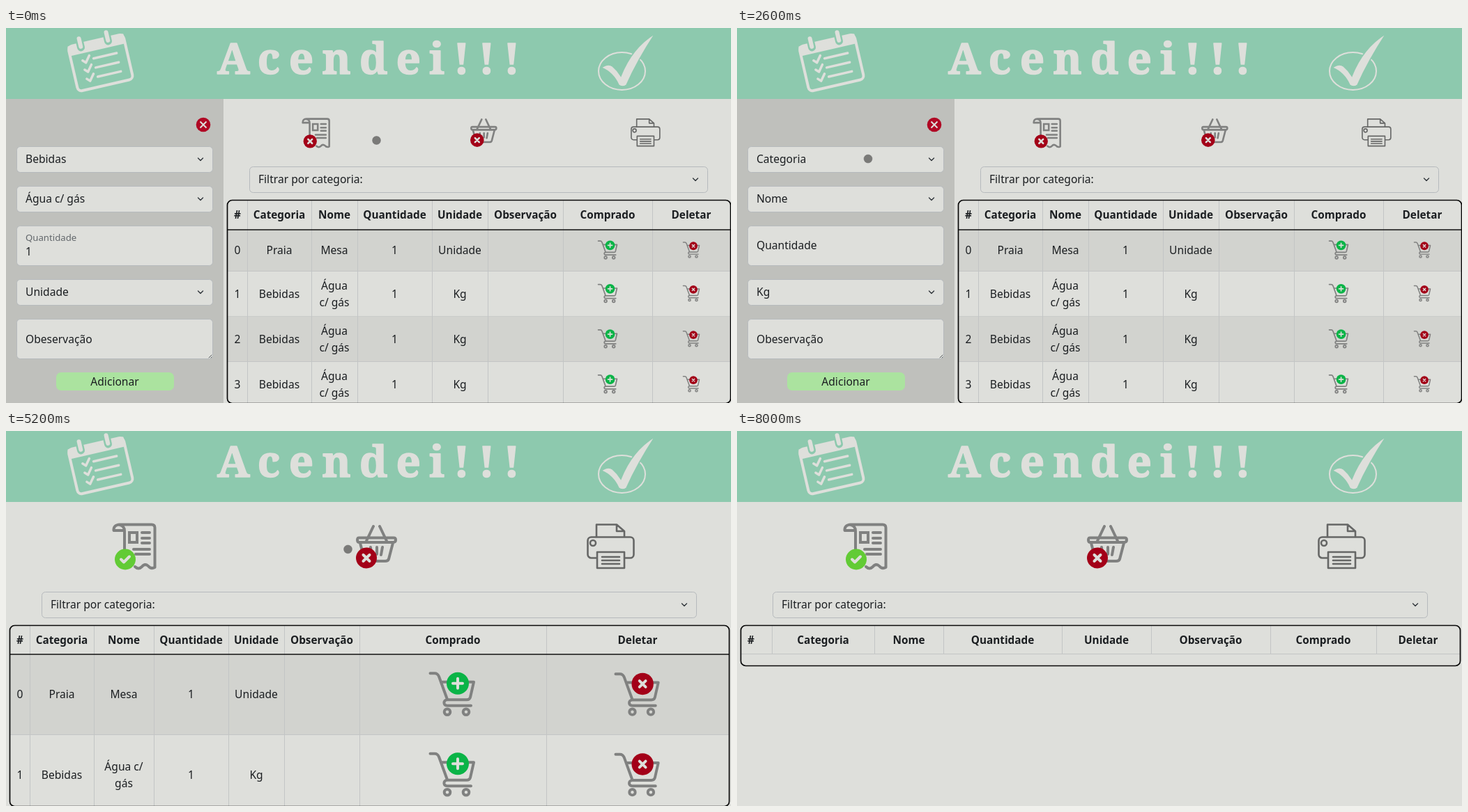
Animation of 1040x539 px, one loop 8700 ms. Source, as an HTML page:

```html
<!DOCTYPE html>
<html lang="pt">
<head>
<meta charset="utf-8">
<style>
html, body { margin: 0; width: 100%; height: 100%; overflow: hidden; background: #dedfdb; }
svg { display: block; width: 100%; height: 100%; }
text { font: 15.6px "Noto Sans", "Open Sans", sans-serif; fill: #1b1e21; }
.mid { text-anchor: middle; }
.head { font-size: 15.3px; font-weight: 700; }
.small { font-size: 13.2px; fill: #62676b; }
.title { font: 900 62px "Noto Serif", serif; letter-spacing: 12.3px; fill: #dedfdb; stroke: #dedfdb; stroke-width: 1.5; stroke-linejoin: round; }
.icon { fill: none; stroke: #808180; stroke-width: 4; stroke-linecap: round; stroke-linejoin: round; }
.mark { fill: none; stroke: #dedfdb; stroke-width: 4; }
.box { fill: #dedfdb; stroke: #b6babd; }
.rule { stroke: #c3c5c5; fill: none; }
.arrow { fill: none; stroke: #30363b; stroke-width: 1.4; stroke-linecap: round; stroke-linejoin: round; }
</style>
</head>
<body>
<svg viewBox="0 0 1040 539" preserveAspectRatio="none">
  <rect width="1040" height="539" fill="#dedfdb"/>
  <rect width="1040" height="102" fill="#8dc9ae"/>
  <g transform="translate(136 49) rotate(-13)" fill="none" stroke="#dedfdb" stroke-width="3.5" stroke-linecap="round" stroke-linejoin="round">
    <rect x="-41" y="-32" width="81" height="66" rx="6" stroke-width="4"/>
    <path d="M-40-31H39V-20H-40Z" fill="#dedfdb"/>
    <path d="M-23-39V-27M17-39V-27" stroke="#8dc9ae" stroke-width="11"/>
    <path d="M-23-40V-28M17-40V-28" stroke-width="6"/>
    <path d="M-9-7.5H25M-9 6H25M-9 19.5H25M-25-8l4 4 7-9M-25 5.5l4 4 7-9M-25 19l4 4 7-9"/>
  </g>
  <text class="title" x="303" y="66">Acendei!!!</text>
  <ellipse cx="883.5" cy="62" rx="33.5" ry="27" fill="none" stroke="#dedfdb" stroke-width="2"/>
  <path d="M854 57Q864 50 870 55Q877 61 882 69Q898 28 931 8Q905 48 890 82Q884 86 879 82Q871 64 854 57Z" fill="#dedfdb" stroke="#8dc9ae" stroke-width="1.5"/>
  <g id="page"></g>
  <circle id="dot" r="6.5" fill="#000" fill-opacity=".45" stroke="#fff" stroke-opacity=".3"/>
</svg>
<script>
const page = document.getElementById('page'), dot = document.getElementById('dot');
const RED = '#a30018', GREEN = '#0ab447', LIME = '#62cb35';
const heads = ['#', 'Categoria', 'Nome', 'Quantidade', 'Unidade', 'Observação', 'Comprado', 'Deletar'];

const text = (x, y, s, cls = '') => `<text x="${x}" y="${y + 5.5}" class="${cls}">${s}</text>`;
const box = (x, y, w, h, cls = 'box', r = 5) =>
  `<rect x="${x + .5}" y="${y + .5}" width="${w}" height="${h}" rx="${r}" class="${cls}"/>`;
const arrow = (x, y) => `<path class="arrow" d="M${x - 3.5} ${y - 1.5}l3.5 3.5 3.5-3.5"/>`;
const select = (x, y, w, label) =>
  box(x, y, w, 37) + text(x + 13, y + 18.5, label) + arrow(x + w - 17, y + 18.5);
const place = (x, y, k, body) => `<g transform="translate(${x} ${y}) scale(${k})" class="icon">${body}</g>`;

const signs = { x: 'M-4.5-4.5L4.5 4.5M4.5-4.5L-4.5 4.5', plus: 'M-7 0H7M0-7V7', ok: 'M-6 0l4 4 8-8' };
const badge = (x, y, color, sign, r = 15) =>
  `<g transform="translate(${x} ${y})"><circle r="${r}" fill="${color}" stroke="none"/><path class="mark" d="${signs[sign]}"/></g>`;

const list = ok =>
  `<path d="M18 11H2.5Q2 3 11 2.5H57Q61.500 2.500 61.500 7V64Q56 67 52 62Q47 58 43 63Q38 68 33 63M11 3Q18 4 18 12V40"/>
   <path d="M25 14H36V28H25ZM43 14H54M43 22H54M43 29H54M31 38H54M34 45H54" stroke-linejoin="miter"/>` +
  badge(19, 52.5, ok ? LIME : RED, ok ? 'ok' : 'x');
const basket =
  `<path d="M15 23L25 2M44 23L34 2M5 18.500H54Q57 18.500 57 21.500T54 25H5Q2 25 2 21.500T5 18.500M6 26L12 49Q13 52 17 52H42Q46 52 47 49L53 26M21 32L22 41M30 32V42M38 32L36 43"/>` +
  badge(15, 47.5, RED, 'x');
const printer =
  `<g stroke="#666766" stroke-width="2.6"><path d="M14 19V1.500H43L54 11V19M43 2V11H53"/>
   <rect x="1.500" y="19.500" width="66" height="30" rx="5"/><circle cx="9" cy="28" r="4"/>
   <path d="M15 41H54V64H15Z" fill="#dedfdb"/><path d="M22 48H47M22 53H47M22 58H47"/></g>`;
const cart = (color, sign) =>
  `<path d="M2.500 2.500H9Q13 2.500 15 7L27 40M20 15H65L60 37Q59 40.500 55 40.500H27Q22 41 22.500 45.500Q23 49 28 49H61"/>
   <circle cx="27" cy="58" r="4.300"/><circle cx="54" cy="58" r="4.300"/>` + badge(42, 17, color, sign, 16);

const wide = {
  x: 5, y: 279, w: 1032, h: 261, line: 321, cols: [34, 126, 212, 319, 399, 507, 775], rows: [321, 436, 552],
  name: ['Água c/', 'gás'], icons: [[152, 132, 1], [502, 135, 1], [833, 133, 1]],
  carts: [[606, 33, 1], [872, 32, .98]], filter: [51, 231, 939]
};
const narrow = {
  x: 317, y: 247, w: 722, h: 293, line: 290, cols: [346, 438, 504, 611, 691, 799, 927], rows: [290, 349, 414.5, 479.5, 544.5],
  name: ['Água', 'c/ gás'], icons: [[424, 129, .645], [666, 130, .655], [896, 130, .62]],
  carts: [[848.5, 14.5, .43], [970.5, 12.5, .37]], filter: [349, 199, 657]
};
const empty = { ...wide, h: 59, cols: [50, 197, 296, 466, 594, 765, 917], rows: [] };

function table(v) {
  const edges = [v.x + 1, ...v.cols, v.x + v.w], bottom = v.rows.length ? 539 : v.line;
  const mid = i => (edges[i] + edges[i + 1]) / 2;
  let out = '', cells = '';
  v.rows.slice(0, -1).forEach((top, i) => {
    const end = v.rows[i + 1], y = (top + end) / 2 + (i || v === wide ? .3 : 0);
    if (i % 2 === 0) out += `<rect x="${v.x}" y="${top}" width="${v.w}" height="${end - top}" fill="#d2d3cf"/>`;
    out += `<path class="rule" d="M${v.x} ${Math.floor(end) + .5}h${v.w}"/>`;
    const vals = i ? [i, 'Bebidas', '', 1, 'Kg'] : [0, 'Praia', 'Mesa', 1, 'Unidade'];
    vals.forEach((s, c) => cells += text(mid(c), y, s, 'mid'));
    if (i) v.name.forEach((s, n) => cells += text(mid(2), y - 12 + 24 * n, s, 'mid'));
    v.carts.forEach(([x, dy, k], c) => cells += place(x, y - dy, k, c ? cart(RED, 'x') : cart(GREEN, 'plus')));
  });
  v.cols.forEach(x => out += `<path class="rule" d="M${x + .5} ${v.y}V${bottom}"/>`);
  out += v.rows.length
    ? `<path d="M${v.x} ${v.line}h${v.w}" stroke="#111" stroke-width="1.6"/>`
    : `<path class="rule" d="M${v.x} ${v.line - .5}h${v.w}"/>`;
  heads.forEach((s, i) => out += text(i ? mid(i) : v.x + 15, v.y + 21.5, s, 'mid head'));
  return out + cells +
    `<rect x="${v.x + .5}" y="${v.y + .5}" width="${v.w}" height="${v.h - 1}" rx="7" fill="none" stroke="#090909" stroke-width="1.7"/>`;
}

function form(filled) {
  return '<rect y="102" width="312" height="437" fill="#bfc0bc"/>' +
    '<circle cx="283" cy="139" r="10.3" fill="#b00824"/><path class="mark" style="stroke-width:2" d="M278.500 134.500l9 9m0-9l-9 9"/>' +
    select(15, 170, 281, filled ? 'Bebidas' : 'Categoria') +
    select(15, 227, 281, filled ? 'Água c/ gás' : 'Nome') +
    box(15, 284, 281, 57) +
    (filled ? text(28, 300.5, 'Quantidade', 'small') + text(28, 321, '1') : text(28, 312.5, 'Quantidade')) +
    select(15, 361, 281, filled ? 'Unidade' : 'Kg') +
    box(15, 418, 281, 57) + text(28, 447, 'Obeservação') +
    '<path class="arrow" style="stroke-width:.8" d="M291 474l4-4M294 474l1-1"/>' +
    '<rect x="72" y="495" width="169" height="26" rx="7" fill="#abe39f"/>' + text(156, 508, 'Adicionar', 'mid');
}

function view(v, ok, side = '') {
  const art = [list(ok), basket, printer];
  return side + v.icons.map((p, i) => place(...p, art[i])).join('') +
    select(...v.filter, 'Filtrar por categoria:') + table(v);
}

// [start, markup]
const scenes = [
  [0, view(narrow, false, form(true))],
  [600, view(wide, false)],
  [2600, view(narrow, false, form(false))],
  [4300, view(wide, true)],
  [5600, view(empty, true)]
];

// Pointer stops: [ms, x, y]
const stops = [
  [100, 531.5, 161.5], [300, 438.5, 152.5], [1000, 438.5, 152.5], [1600, 162, 202], [1800, 196, 191],
  [1900, 196, 191], [2100, 188, 188], [2900, 188, 188], [3300, 227, 147], [3400, 227, 147], [3900, 430, 169],
  [4000, 430, 169], [4200, 445, 161], [4300, 445, 161], [4600, 355, 272], [4700, 355, 272], [5200, 490.5, 170],
  [5300, 490.5, 170], [5500, 516, 169], [5800, 539, 174], [5900, 539, 174], [6600, 500, 388.5], [6800, 483, 365],
  [7200, 400, 300], [7700, 793, 180], [7800, 793, 180], [7900, 711, 151]
];

function pointer(t) {
  const i = stops.findIndex(s => s[0] >= t);
  if (i < 1) return stops[i < 0 ? stops.length - 1 : 0].slice(1);
  const [a, ax, ay] = stops[i - 1], [b, bx, by] = stops[i];
  const u = (t - a) / (b - a), e = u * u * (3 - 2 * u);
  return [ax + (bx - ax) * e, ay + (by - ay) * e];
}

let shown;
function draw(now) {
  const t = Math.floor(now % 8700 / 100) * 100;
  const scene = scenes.filter(s => s[0] <= t).pop();
  if (scene !== shown) page.innerHTML = (shown = scene)[1];
  const [x, y] = pointer(t);
  dot.setAttribute('cx', x);
  dot.setAttribute('cy', y);
  dot.style.display = t < 8000 ? '' : 'none';
}

const start = performance.now();
function tick() {
  draw(performance.now() - start);
  requestAnimationFrame(tick);
}
tick();
</script>
</body>
</html>
```
